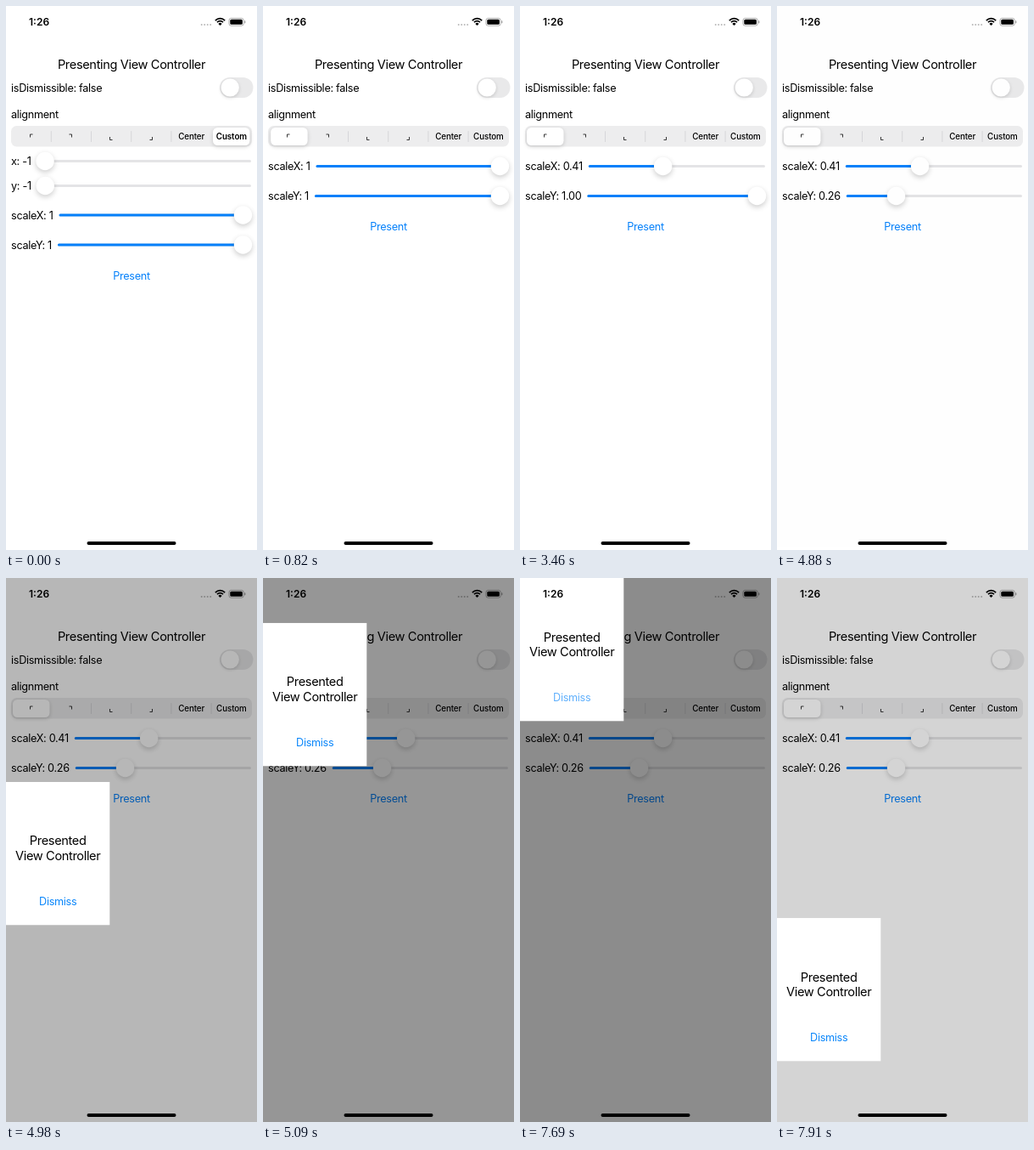
Write an HTML page with a canvas that moves like this. It is 296x640 px and loops after 8000 ms.

```html
<!DOCTYPE html>
<html lang="en">
<head>
<meta charset="utf-8">
<title>Presentation demo</title>
<style>
  html, body { margin: 0; width: 100%; height: 100%; overflow: hidden; background: #fff; }
  canvas { display: block; width: 296px; height: 640px; }
</style>
</head>
<body>
<canvas id="stage"></canvas>
<script>
const W = 296, H = 640, LOOP = 8000;
const BLUE = '#0580fa', TRACK = '#e4e4e6', FILL = '#ededee';
const canvas = document.getElementById('stage');
const ctx = canvas.getContext('2d');
const dpr = window.devicePixelRatio || 1;
canvas.width = W * dpr;
canvas.height = H * dpr;

// The screen updates only in short bursts: [first, last, count]
const bursts = [[0, 0, 1], [500, 820, 4], [1850, 2210, 4], [2350, 2350, 1],
                [3460, 4020, 6], [4760, 5310, 6], [7690, 7910, 3]];
const ticks = bursts.flatMap(([first, last, count]) =>
  Array.from({ length: count }, (_, i) => first + (last - first) * i / Math.max(1, count - 1)));
const hold = t => ticks.filter(tick => tick <= t + 0.01).pop();

const mix = (a, b, p) => a + (b - a) * p;
const smooth = (t, from, to) => {
  const p = Math.min(1, Math.max(0, (t - from) / (to - from)));
  return p * p * (3 - 2 * p);
};
// Critically damped spring, from 0 to 1
const spring = (t, start, speed) => {
  const x = Math.max(0, t - start) / 1000 * speed;
  return 1 - (1 + x) * Math.exp(-x);
};

function setFont(size, weight = 400, tracking = -0.025) {
  ctx.font = `${weight} ${size}px Inter, Roboto, sans-serif`;
  ctx.letterSpacing = `${tracking * size}px`;
}

function text(str, x, y, { size = 12.7, weight = 400, tracking, align = 'left', color = '#000' } = {}) {
  setFont(size, weight, tracking);
  ctx.textAlign = align;
  ctx.fillStyle = color;
  ctx.fillText(str, x, y);
}

function box(x, y, w, h, radius, color) {
  ctx.fillStyle = color;
  ctx.beginPath();
  ctx.roundRect(x, y, w, h, radius);
  ctx.fill();
}

function disc(x, y, r, color) {
  ctx.fillStyle = color;
  ctx.beginPath();
  ctx.arc(x, y, r, 0, 7);
  ctx.fill();
}

function shadowed(alpha, blur, dy, draw) {
  ctx.save();
  ctx.shadowColor = `rgba(0,0,0,${alpha})`;
  ctx.shadowBlur = blur * dpr;
  ctx.shadowOffsetY = dy * dpr;
  draw();
  ctx.restore();
}

function slider(label, y, fraction) {
  text(label, 6, y + 4.7);
  const left = 6 + ctx.measureText(label).width + 7, right = 289;
  const knob = mix(left + 9.5, right - 9.5, fraction);
  box(left, y - 1.5, right - left, 3, 1.5, TRACK);
  if (fraction > 0) box(left, y - 1.5, knob - left, 3, 1.5, BLUE);
  shadowed(0.2, 6, 2.5, () => disc(knob, y, 10.7, '#fff'));
}

// Small corner mark; sx and sy point from the corner along its arms
function corner(x, y, sx, sy) {
  ctx.strokeStyle = '#222';
  ctx.lineWidth = 0.9;
  ctx.beginPath();
  ctx.moveTo(x + 3 * sx, y);
  ctx.lineTo(x, y);
  ctx.lineTo(x, y + 3.5 * sy);
  ctx.stroke();
}

function segments(position, custom) {
  const pitch = 47.2;
  box(6, 141, 284, 24.5, 6.5, FILL);
  for (let i = 1; i < 6; i++) {
    const near = Math.abs(i - 0.5 - position) < 0.75;
    if (!near) box(5.6 + i * pitch, 147, 1, 13, 0.5, '#d6d6d9');
  }
  shadowed(0.18, 5, 1.5, () => box(8 + position * pitch, 143, 43.5, 21, 5.5, '#fff'));
  corner(28.5, 151, 1, 1);
  corner(77.5, 151, -1, 1);
  corner(122.5, 157.5, 1, -1);
  corner(172.5, 157.5, -1, -1);
  const style = { size: 9.8, weight: 500, tracking: -0.01, align: 'center' };
  text('Center', 218.7, 157, style);
  text('Custom', 265.9, 157, { ...style, weight: custom ? 600 : 500 });
}

function page(t) {
  const custom = t < 500;
  const shift = custom ? 57.5 : 0;
  text('Presenting View Controller', 148, 74.3, { size: 14.6, align: 'center' });
  text('isDismissible: false', 6, 100.8);
  box(252, 84, 39.5, 24, 12, '#e9e9ea');
  shadowed(0.15, 4, 1.5, () => disc(264.3, 96, 10.6, '#fff'));
  text('alignment', 6, 132.4);
  segments(5 * (1 - spring(t, 480, 22)), custom);

  if (custom) {
    slider('x: -1', 182.5, 0);
    slider('y: -1', 211.5, 0);
  }
  const scaleX = mix(1, 0.414, smooth(t, 1800, 2260));
  const scaleY = mix(1, 0.262, smooth(t, 3460, 4020));
  slider('scaleX: ' + (t < 1850 ? '1' : scaleX.toFixed(2)), 188.5 + shift, scaleX);
  slider('scaleY: ' + (t < 3460 ? '1' : scaleY.toFixed(2)), 223.5 + shift, scaleY);

  const pressed = t >= 4760 && t < 4865;
  ctx.globalAlpha = pressed ? 0.55 : 1;
  text('Present', 148, 264.3 + shift, { align: 'center', color: BLUE });
  ctx.globalAlpha = 1;
}

function card(t, y) {
  ctx.fillStyle = '#fff';
  ctx.fillRect(0, y, 122.3, 168.3);
  const title = { size: 14.6, align: 'center' };
  text('Presented', 61.2, y + 74.5, title);
  text('View Controller', 61.2, y + 92.3, title);
  const pressed = t >= 7690 && t < 7795;
  ctx.globalAlpha = pressed ? 0.65 : 1;
  text('Dismiss', 61.2, y + 145, { align: 'center', color: '#0a86fa' });
  ctx.globalAlpha = 1;
}

function statusBar() {
  text('1:26', 27, 23.2, { size: 12, weight: 600, tracking: 0 });
  for (let i = 0; i < 4; i++) disc(230.7 + i * 3.5, 22, 1, 'rgba(0,0,0,.28)');

  ctx.strokeStyle = '#000';
  ctx.lineWidth = 1.7;
  for (const r of [8, 5]) {
    ctx.beginPath();
    ctx.arc(252.5, 22.7, r, -Math.PI * 0.75, -Math.PI * 0.25);
    ctx.stroke();
  }
  ctx.fillStyle = '#000';
  ctx.beginPath();
  ctx.moveTo(252.5, 23);
  ctx.arc(252.5, 23, 3, -Math.PI * 0.75, -Math.PI * 0.25);
  ctx.fill();

  ctx.strokeStyle = 'rgba(0,0,0,.38)';
  ctx.lineWidth = 0.8;
  ctx.beginPath();
  ctx.roundRect(262.9, 14.4, 17.4, 8.8, 2.6);
  ctx.stroke();
  box(264.3, 15.8, 14.6, 6, 1.5, '#000');
  box(281.3, 17.3, 1.1, 3, 0.5, 'rgba(0,0,0,.4)');
}

function render(t) {
  ctx.setTransform(dpr, 0, 0, dpr, 0, 0);
  ctx.fillStyle = '#fff';
  ctx.fillRect(0, 0, W, H);
  page(t);

  const shown = spring(t, 4864, 18.26) - spring(t, 7794, 18.26);
  if (shown > 0) {
    ctx.fillStyle = `rgba(0,0,0,${0.45 * shown})`;
    ctx.fillRect(0, 0, W, H);
    card(t, H * (1 - shown));
  }
  statusBar();
  box(95.5, 630, 105, 4, 2, '#000');
}

const begin = performance.now();
function frame() {
  render(hold((performance.now() - begin) % LOOP));
  requestAnimationFrame(frame);
}
frame();
</script>
</body>
</html>
```
